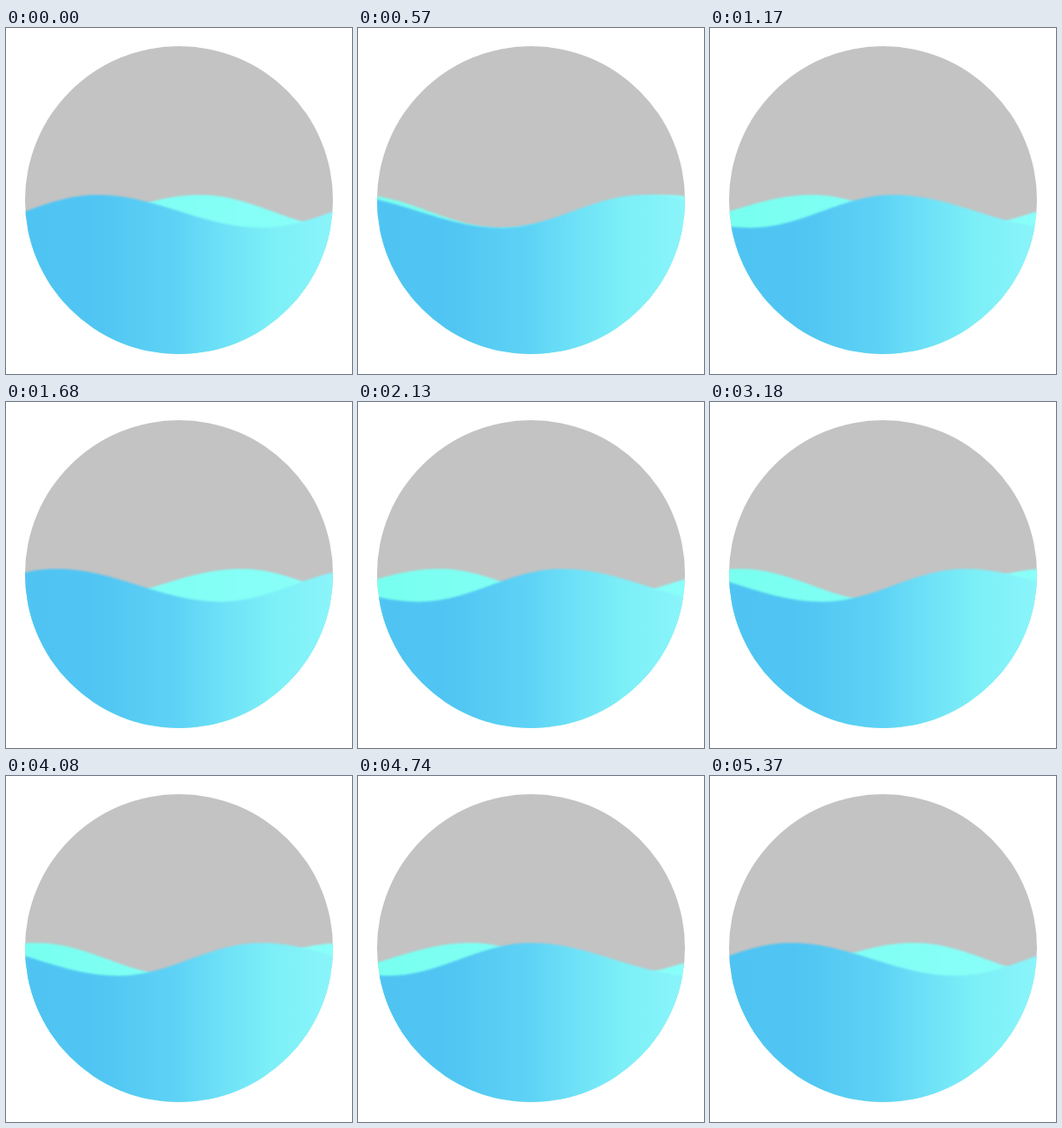
An HTML page with a canvas for the animation above (5.4 s loop, 400x400 px).

```html
<!DOCTYPE html>
<html lang="en">
<head>
<meta charset="utf-8">
<title>Water level</title>
<style>
  html, body { margin: 0; width: 100%; height: 100%; overflow: hidden; background: #fff; }
  canvas { display: block; width: 400px; height: 400px; }
</style>
</head>
<body>
<canvas id="stage" width="400" height="400"></canvas>
<script>
const ctx = document.getElementById('stage').getContext('2d');
const CX = 200, CY = 199, R = 178;
const PERIOD = 900, STEP = 30;
const LENGTH = 356;             // one wave spans the circle
const RISE = 165, FALL = LENGTH - RISE;
const MID = 211.9, AMP = 19;
const FRONT_CREST = 105, BACK_CREST = 225;

function gradient(stops) {
  const g = ctx.createLinearGradient(CX - R, 0, CX + R, 0);
  stops.forEach(([at, color]) => g.addColorStop(at, color));
  return g;
}

const backFill = gradient([[0, '#78fff0'], [0.4, '#80fff4'], [1, '#8afffa']]);
const frontFill = gradient([
  [0, '#4fc4f3'], [0.25, '#51c6f3'], [0.5, '#5fd3f6'],
  [0.65, '#6ee2f7'], [0.8, '#7ceff7'], [1, '#8af5fb']
]);

// Height at distance u from a crest: slow slope after it, steep one before it
function waveY(u) {
  u = ((u % LENGTH) + LENGTH) % LENGTH;
  const phase = u < FALL ? u / FALL : (LENGTH - u) / RISE;
  return MID - AMP * Math.cos(Math.PI * phase);
}

function drawWave(crest, dir, fill) {
  ctx.beginPath();
  ctx.moveTo(0, 420);
  for (let x = 0; x <= 400; x += 2) ctx.lineTo(x, waveY(dir * (x - crest)));
  ctx.lineTo(400, 420);
  ctx.closePath();
  ctx.fillStyle = fill;
  ctx.fill();
}

function draw(t) {
  const shift = LENGTH * (t % PERIOD) / PERIOD;
  ctx.fillStyle = '#fff';
  ctx.fillRect(0, 0, 400, 400);
  ctx.save();
  ctx.beginPath();
  ctx.arc(CX, CY, R, 0, Math.PI * 2);
  ctx.clip();
  ctx.fillStyle = '#c3c3c3';
  ctx.fillRect(0, 0, 400, 400);
  ctx.filter = 'blur(1px)';
  drawWave(BACK_CREST - shift, -1, backFill);
  drawWave(FRONT_CREST + shift, 1, frontFill);
  ctx.restore();
}

const start = performance.now();
function tick() {
  const t = performance.now() - start;
  draw(Math.floor(t / STEP) * STEP);
  requestAnimationFrame(tick);
}
tick();
</script>
</body>
</html>
```
